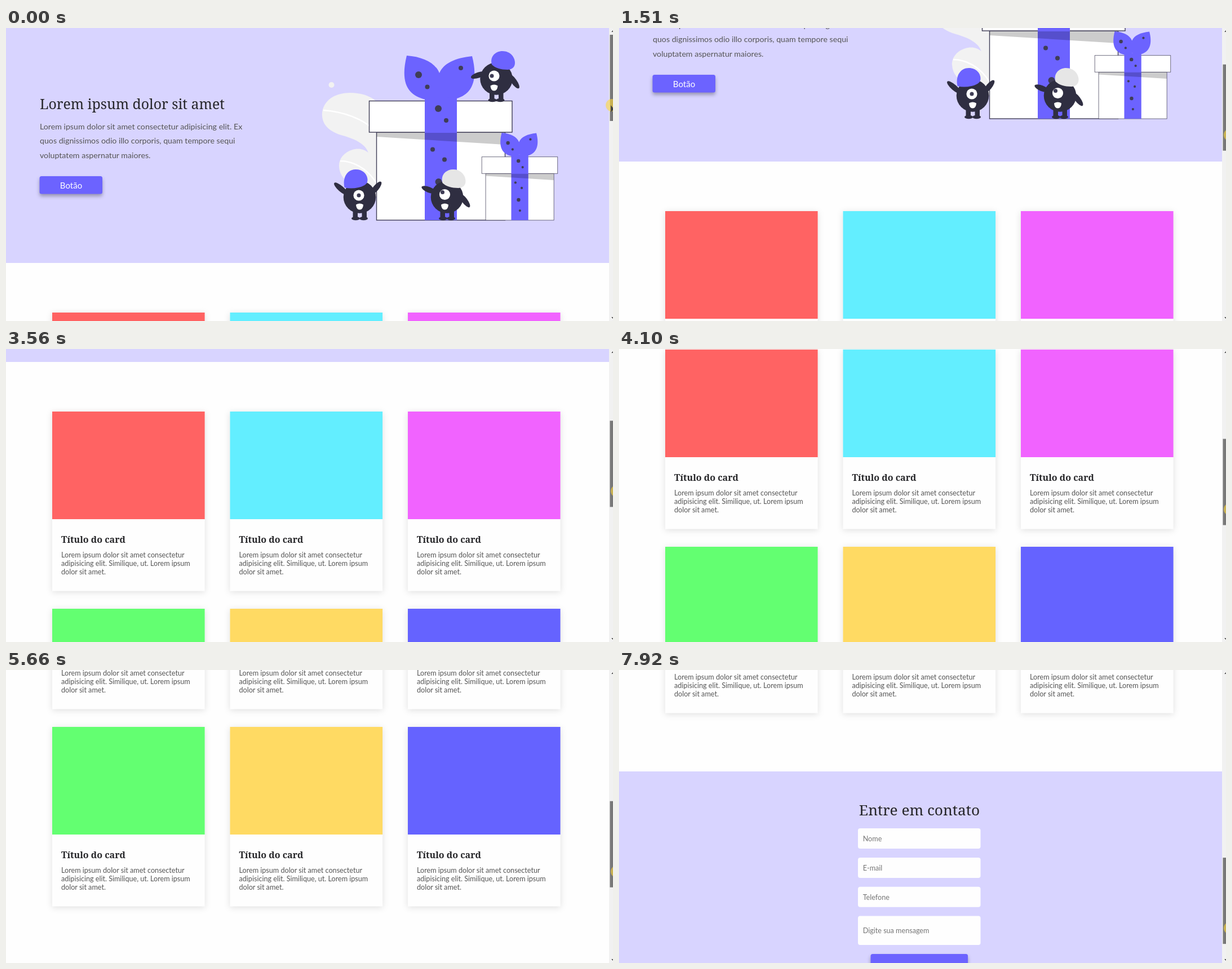
These frames come from a looping animation (1077 by 520 pixels, 7990 ms). An HTML page:

```html
<!DOCTYPE html>
<html lang="pt">
<head>
<meta charset="utf-8">
<style>
  html, body { margin: 0; width: 100%; height: 100%; overflow: hidden; background: #fefefe; }
  svg { display: block; width: 1077px; height: 520px; }
  text { font: 12.61px Lato, sans-serif; fill: #555; }
  .lead { font-size: 14.19px; }
  .btn { font-size: 15px; fill: #fff; text-anchor: middle; }
  .title { font: 24.8px "Noto Serif", serif; fill: #262629; }
  .contact { font-size: 26.2px; text-anchor: middle; }
  .name { font: bold 16px "Noto Serif", serif; fill: #262629; }
  .hint { fill: #757575; }
  .card { fill: #fefefe; filter: drop-shadow(0 2px 6px rgba(0, 0, 0, .12)); }
  .button { fill: #6c63ff; filter: drop-shadow(0 4px 3px rgba(0, 0, 0, .3)); }
</style>
</head>
<body>
<svg viewBox="0 0 1077 520">
  <g id="page"></g>
  <rect x="1070" width="7" height="520" fill="#f1f1f1"/>
  <path d="M1074 7L1078 3V7ZM1074 513H1078V517Z" fill="#505050"/>
  <rect id="thumb" x="1071.5" width="6" height="153" fill="#787878"/>
  <g id="cursor">
    <circle r="11" fill="#ffd83a" opacity=".6"/>
    <path d="M-2 0V12L1 9.500H6Z" fill="#444"/>
  </g>
</svg>
<script>
const $ = id => document.getElementById(id);
const rect = (x, y, w, h, attrs) => `<rect x="${x}" y="${y}" width="${w}" height="${h}" ${attrs}/>`;
const text = (x, y, cls, str) => `<text x="${x}" y="${y}" class="${cls}">${str}</text>`;
const circle = (x, y, r, fill) => `<circle cx="${x}" cy="${y}" r="${r}" fill="${fill}"/>`;
const shape = (d, fill) => `<path d="${d}" fill="${fill}"/>`;
const purple = '#6c63ff', dark = '#2f2e41', spot = '#3f3d56', lilac = '#d8d4ff';

function gift() {
  const edge = `fill="#fff" stroke="${spot}" stroke-width="1.400"`;
  const spots = [[732, 83, 6], [807, 71, 4], [747.5, 104.5, 4], [767, 143, 6], [781, 164, 4],
    [757, 215.5, 4], [778, 233.5, 4], [767.5, 273, 6], [772, 309, 4]];
  return rect(657.5, 185, 228, 156, edge) + rect(644.5, 129.5, 253.5, 55.5, edge) +
    rect(743, 122, 57, 219, `fill="${purple}"`) +
    shape('M711 49C740 51 762 62 769 80C776 63 797 53 827 50C838 92 827 117 800 125L769 122L745 127C713 120 699 98 711 49Z', purple) +
    shape('M658 186H885V207L658 193Z', 'rgba(0,0,0,.2)') +
    spots.map(s => circle(...s, spot)).join('');
}

// Each arm runs from the shoulder to the hand, relative to the body centre.
function monster(x, y, hat, hatColor, eye, pupil, mouth, arms) {
  const limb = ([x1, y1, x2, y2]) => {
    const len = Math.hypot(x2 - x1, y2 - y1) / 2;
    const turn = Math.atan2(y2 - y1, x2 - x1) * 180 / Math.PI;
    return `<ellipse rx="${len}" ry="5" fill="${dark}" transform="translate(${(x1 + x2) / 2} ${(y1 + y2) / 2}) rotate(${turn})"/>`;
  };
  const leg = lx => rect(lx - 4, 24, 8.5, 15, `fill="${dark}"`) +
    `<ellipse cx="${lx + (lx < 0 ? 1 : -1)}" cy="38" rx="7.500" ry="3.200" fill="${dark}"/>`;
  const [mx, my] = mouth;
  return `<g transform="translate(${x} ${y})">` + arms.map(limb).join('') + leg(-8) + leg(8) +
    circle(0, 0, 28.8, dark) + circle(...eye, 9.6, '#fff') + circle(...pupil, 3.5, spot) +
    shape(`M${mx - 6.5} ${my - 3}q6.500 -4 13 0q-.5 9 -6.500 9t-6.500 -9Z`, '#fff') +
    shape(hat, hatColor) + '</g>';
}

function hero() {
  const sideHat = 'M-8 -25C-12 -39 -2 -49 11 -49C25 -49 33 -38 33 -28C33 -20 27 -16 20 -16C8 -16 -2 -19 -8 -25Z';
  const frontHat = 'M-27 -17C-31 -36 -21 -49 -7 -49C7 -49 14 -39 14 -30C14 -22 6 -19 -2 -17Q-16 -14 -27 -17Z';
  const lines = ['Lorem ipsum dolor sit amet consectetur adipisicing elit. Ex',
    'quos dignissimos odio illo corporis, quam tempore sequi', 'voluptatem aspernatur maiores.'];
  const box = gift();
  return rect(0, 0, 1077, 417, `fill="${lilac}"`) +
    text(60, 143.5, 'title', 'Lorem ipsum dolor sit amet') +
    lines.map((l, i) => text(60, 179.8 + i * 25.5, 'lead', l)).join('') +
    rect(59.5, 263, 111.5, 31.5, 'rx="3.500" class="button"') + text(115.5, 284.8, 'btn', 'Botão') +
    circle(577.5, 101, 5, '#f2f2f2') +
    shape('M657 130C640 115 610 112 590 118C567 125 560 143 561 156C562 176 580 186 598 191C622 198 640 207 644 225L657 245Z', '#f2f2f2') +
    shape('M657 240C645 215 628 212 615 216C598 221 590 234 591 246C592 262 602 272 617 280L657 300Z', '#f2f2f2') +
    '<path d="M563 146C595 148 635 160 657 185M593 236C615 236 640 248 657 275" fill="none" stroke="#fff" stroke-width="2.500"/>' +
    box + monster(782.5, 300, sideHat, '#e6e6e6', [-4, -4.5], [-8, -8.5], [-4, 16.5],
      [[-20, -8, -45, -18], [22, -6, 40, 18]]) +
    `<g transform="translate(910 186) scale(.531) translate(-768.5 -49)">${box}</g>` +
    monster(870, 90, sideHat, purple, [-4, -5], [-8, -5], [-4, 15.5],
      [[-18, -11, -45, -2], [22, -8, 40, 17]]) +
    monster(627.5, 300, frontHat, purple, [-1.5, -3], [-1.5, -3], [0, 16.5],
      [[-21, -4, -45, -25], [20, -5, 38, -27]]);
}

function cards() {
  const colors = ['#ff6363', '#63eeff', '#f163ff', '#63ff71', '#ffda63', '#6563ff'];
  const lines = ['Lorem ipsum dolor sit amet consectetur',
    'adipisicing elit. Similique, ut. Lorem ipsum', 'dolor sit amet.'];
  return colors.map((color, i) => {
    const x = 82 + i % 3 * 315.5, y = i < 3 ? 505 : 855;
    return rect(x, y, 270.6, 318.5, 'class="card"') + rect(x, y, 270.6, 191, `fill="${color}"`) +
      text(x + 16, y + 233, 'name', 'Título do card') +
      lines.map((l, k) => text(x + 16, y + 259 + k * 15.14, '', l)).join('');
  }).join('');
}

function contact() {
  const field = (y, h, label) => rect(424, y, 217.5, h, 'rx="4" fill="#fefefe"') +
    text(432.7, y + h / 2 + 4.8, 'hint', label);
  return rect(0, 1277, 1077, 500, `fill="${lilac}"`) +
    text(533, 1355, 'title contact', 'Entre em contato') +
    field(1378, 36, 'Nome') + field(1430, 36, 'E-mail') + field(1481.7, 36, 'Telefone') +
    field(1533.5, 51.5, 'Digite sua mensagem') +
    rect(446.5, 1601, 172.5, 36, 'rx="3.500" class="button"');
}

$('page').innerHTML = hero() + cards() + contact();

// Scrollbar drags: first step, last step, step count, distance, share of time spent speeding up or slowing down
const drags = [
  [270, 1720, 22, 198, .11],
  [2180, 3020, 13, 167, .24],
  [3420, 4380, 15, 182, .12],
  [4780, 5660, 14, 207, .15],
  [6140, 6970, 13, 193, .15],
  [7300, 8127, 13, 184, .15]
];

function ease(u, ramp) {
  if (u > .5) return 1 - ease(1 - u, ramp);
  return (u < ramp ? u * u / (2 * ramp) : u - ramp / 2) / (1 - ramp);
}

function scrollAt(t) {
  let y = 0;
  for (const [start, end, count, dist, ramp] of drags) {
    if (t < start) break;
    const step = Math.floor((t - start) / (end - start) * (count - 1) + .12) + 1;
    y += dist * ease(Math.min(step, count) / count, ramp);
  }
  return Math.round(y);
}

function draw(now) {
  const y = scrollAt(now % 7990), top = 12 + y * .2927;
  $('page').setAttribute('transform', `translate(0 ${-y})`);
  $('thumb').setAttribute('y', top);
  $('cursor').setAttribute('transform', `translate(${1075 + 9 * Math.min(1, y / 150)} ${top + 125})`);
  requestAnimationFrame(draw);
}
draw(0);
</script>
</body>
</html>
```
